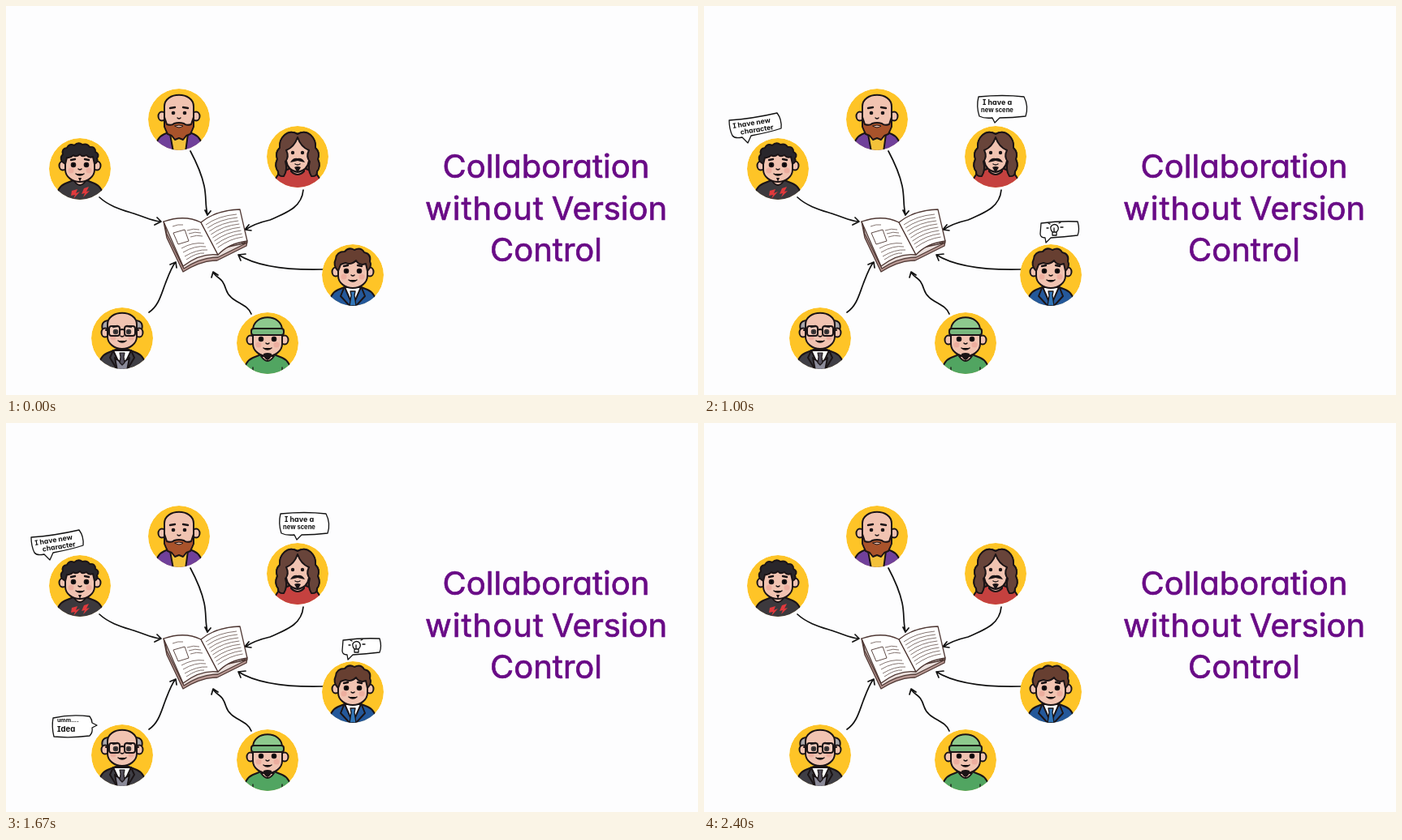
An HTML page for the animation above (2.47 s loop, 852 by 480 pixels).

```html
<!DOCTYPE html>
<html lang="en">
<head>
<meta charset="utf-8">
<title>Collaboration without Version Control</title>
<style>
  html, body { margin: 0; width: 100%; height: 100%; overflow: hidden; background: #fdfdfe; }
  svg { display: block; width: 100vw; height: 100vh; }
  text { font-family: Inter, "Open Sans", sans-serif; font-feature-settings: "cv11", "cv08"; }
  .title { font-size: 40px; fill: #690b86; stroke: #690b86; stroke-width: .7; stroke-linejoin: round; text-anchor: middle; }
  .line { fill: none; stroke: #111; stroke-width: 1.7; stroke-linecap: round; stroke-linejoin: round; }
  .face { stroke: #1b1416; stroke-width: 2; stroke-linejoin: round; stroke-linecap: round; }
  .face .open { fill: none; }
  .face .dot { fill: #1b1416; stroke: none; }
  .skin { fill: #f1c3b1; }
  .blush { fill: #e89a8e; stroke: none; opacity: .5; }
  .bubble { visibility: hidden; }
  .bubble path { fill: #fff; stroke: #111; stroke-width: 1.3; stroke-linejoin: round; stroke-linecap: round; }
  .bubble text { font-weight: 700; fill: #111; }
</style>
</head>
<body>
<svg viewBox="0 0 852 480">
  <defs>
    <clipPath id="disc"><circle r="38"/></clipPath>
    <g id="ears" class="skin">
      <ellipse cx="-21" cy="-4" rx="4.5" ry="5.5"/><ellipse cx="21" cy="-4" rx="4.5" ry="5.5"/>
    </g>
    <path id="head" class="skin" d="M-18-14C-18-33 18-33 18-14V1C18 10 9 16 0 16S-18 10-18 1Z"/>
    <g id="look">
      <circle class="blush" cx="-11" cy="2" r="3.5"/><circle class="blush" cx="11" cy="2" r="3.5"/>
      <circle class="dot" cx="-8" cy="-5" r="2.3"/><circle class="dot" cx="8" cy="-5" r="2.3"/>
      <path class="open" d="M-11-11L-6-12M6-12L11-11" stroke-width="2.4"/>
      <path class="open" d="M-2 0Q0 2 2 0M-5 6Q0 10 5 6" stroke-width="1.5"/>
    </g>
    <path id="body" d="M-31 40Q-28 22-18 18L-8 14H8L18 18Q28 22 31 40Z"/>
  </defs>

  <g id="arrows" class="line"></g>

  <g stroke="#4f3834" stroke-width="1.3" stroke-linejoin="round">
    <path fill="#b99994" d="M194 266L198 286L218 328Q240 314 260 314L296 296L297 290L260 306Z"/>
    <path fill="#eadfdc" d="M195 268L198 281L219 324Q240 310 261 310L297 292L260 300Z"/>
    <path fill="#fff" d="M194 266Q220 257 240 267L261 307Q240 304 218 321Z"/>
    <path fill="#fff" d="M240 267Q258 252 288 251L297 290Q274 293 261 307Z"/>
    <path fill="none" stroke-width=".9" d="M206 280L220 276L225 290L212 294Z"/>
    <path fill="none" stroke="#857672" stroke-width="1" d="M205 272Q212 269 218 270M223 277Q231 274 238 276M225 281Q233 278 240 280M227 285Q235 282 242 284M216 299Q230 291 244 293M218 304Q233 295 246 297M220 309Q235 300 248 301M222 313Q235 304 244 305"/>
    <path id="rules" fill="none" stroke="#857672" stroke-width="1"/>
  </g>

  <g id="people">
    <g data-at="213 140">
      <use href="#body" fill="#70409a"/>
      <path fill="#f3c13a" d="M-11 18L-7 40H8L11 18Z"/>
      <use href="#ears"/><use href="#head" y="-2"/>
      <path fill="#a9532b" d="M-18-3L-15 6Q-9 8-6 5Q0 3 6 5Q9 8 15 6L18-3L18 9Q16 14 14 18L9 20L5 25L0 23L-5 25L-9 20L-14 18Q-16 14-18 9Z"/>
      <path class="skin" stroke-width="1" d="M-5 8Q0 12 5 8Q0 6-5 8Z"/>
      <circle class="dot" cx="-7" cy="-8" r="2.3"/><circle class="dot" cx="7" cy="-8" r="2.3"/>
      <path class="open" d="M-11-14L-5-15M5-15L11-14" stroke-width="2.4"/>
      <path class="open" d="M-2-2Q0 0 2-2" stroke-width="1.4"/>
    </g>
    <g data-at="91 201">
      <use href="#body" fill="#3c393d"/>
      <path class="skin" d="M-7 15Q0 25 7 15Z"/>
      <path fill="#e0393c" stroke="none" d="M-10 27L-3 25L-5 30L0 28L-8 37L-6 32L-11 33ZM5 24L11 22L8 28L12 27L4 35L6 30L2 31Z"/>
      <use href="#ears"/><use href="#head"/><use href="#look"/>
      <path fill="#29262b" d="M-18-6L-22-9Q-25-14-21-18Q-23-25-16-26Q-13-32-7-29Q-2-34 3-30Q9-32 12-27Q19-28 19-21Q25-18 21-13Q23-9 18-6L16-15Q11-13 8-17Q3-14 0-18Q-5-14-8-17Q-12-13-16-14Z"/>
      <path class="dot" d="M-2 11H2L0 16Z"/>
    </g>
    <g data-at="359 186">
      <path fill="#68443a" d="M0-28C-13-35-23-23-22-11Q-28-5-25 3Q-29 12-24 18Q-25 26-15 28H15Q25 26 24 18Q29 12 25 3Q28-5 22-11C23-23 13-35 0-28Z"/>
      <use href="#body" fill="#c5413f"/>
      <path class="skin" d="M-8 13V18Q0 26 8 18V13Z"/>
      <path class="skin" d="M-14-10Q-12-20 0-23Q12-20 14-10V5Q12 17 0 19Q-12 17-14 5Z"/>
      <path fill="#68443a" d="M0-28C-13-35-23-23-22-11Q-28-5-25 3Q-29 12-24 18Q-24 25-17 24Q-12 16-15 6Q-10 0-14-8Q-4-12 0-24Q4-12 14-8Q10 0 15 6Q12 16 17 24Q24 25 24 18Q29 12 25 3Q28-5 22-11C23-23 13-35 0-28Z"/>
      <circle class="dot" cx="-6" cy="-5" r="2.2"/><circle class="dot" cx="6" cy="-5" r="2.2"/>
      <path class="dot" d="M0 2Q6 1 9 7Q4 6 0 5Q-4 6-9 7Q-6 1 0 2ZM-4 13Q0 11 4 13L0 20Z"/>
      <path class="open" d="M-3 9Q0 11 3 9" stroke-width="1.4"/>
    </g>
    <g data-at="427 332">
      <use href="#body" fill="#24589a"/>
      <path fill="#fff" d="M-10 15L0 38L10 15Z"/>
      <path fill="#3276b8" stroke-width="1.3" d="M-3 20H3L2 25L4 38H-4L-2 25Z"/>
      <path class="open" d="M-11 16L-15 26L-3 39M11 16L15 26L3 39"/>
      <use href="#ears"/><use href="#head"/><use href="#look"/>
      <path fill="#673f31" d="M-18-5Q-25-12-21-20Q-20-29-10-29Q-5-35 2-31Q10-35 14-28Q23-26 21-17Q24-11 18-5L16-14Q8-11 4-18Q-2-12-9-15Q-13-14-15-13Z"/>
    </g>
    <g data-at="143 410">
      <use href="#body" fill="#3f3e45"/>
      <path fill="#fff" d="M-11 15L0 39L11 15Z"/>
      <path fill="#8b8a99" d="M-9 24L0 31L9 24L6 40H-6Z"/>
      <path fill="#55505d" stroke-width="1.2" d="M-3 18H3L2 23L3 30L0 33L-3 30L-2 23Z"/>
      <path class="open" d="M-11 15L-15 24L-6 39M11 15L15 24L6 39"/>
      <g transform="translate(0 -3)">
        <path fill="#a9a6aa" d="M-17-19Q-27-18-24-7L-18-4ZM17-19Q27-18 24-7L18-4Z"/>
        <use href="#ears"/><use href="#head"/><use href="#look"/>
        <g fill="#fff" fill-opacity=".15"><rect x="-16" y="-12" width="13" height="12" rx="3"/><rect x="3" y="-12" width="13" height="12" rx="3"/></g>
        <path class="open" d="M-3-7Q0-9 3-7M-16-7H-20M16-7H20"/>
      </g>
    </g>
    <g data-at="322 416">
      <use href="#body" fill="#51a561"/>
      <path class="skin" d="M-8 16Q0 28 8 16Z"/>
      <path class="open" d="M-18 30V40M18 30V40" stroke-width="1.3"/>
      <use href="#ears"/><use href="#head"/><use href="#look"/>
      <path class="dot" d="M-5 13Q0 11 5 13Q5 19 0 21Q-5 19-5 13Z"/>
      <path fill="#8dc98d" d="M-18-16C-18-37 18-37 18-16Z"/>
      <rect x="-20" y="-18" width="40" height="8" rx="3" fill="#79b87e"/>
    </g>
  </g>

  <g class="bubble" data-from="530">
    <path d="M31 141Q60 139 90 132Q96 140 95 151Q80 156 58 160L54 169L47 162Q38 164 35 160Q31 152 31 141Z"/>
    <g transform="rotate(-9 36 151)" font-size="8.6"><text x="36" y="151">I have new</text><text x="44" y="160">character</text></g>
  </g>
  <g class="bubble" data-from="730">
    <path d="M338 112Q368 109 394 112Q400 124 396 136Q380 138 364 138L358 144L355 138Q345 139 339 136Q335 124 338 112Z"/>
    <text x="343" y="122" font-size="9">I have a</text><text x="341" y="131" font-size="7.6">new scene</text>
  </g>
  <g class="bubble" data-from="930">
    <path d="M415 268Q438 265 460 266Q463 276 460 283Q443 285 427 286L421 292L420 286Q414 286 414 281Z"/>
    <path d="M429 279Q425 274 428 271Q432 268 435 271Q438 275 434 279ZM429 279V283H434V279M431 278V274M422 274H424M439 273H442M424 268L426 269M437 268L439 267"/>
  </g>
  <g class="bubble" data-from="1200">
    <path d="M58 364Q80 359 103 362Q106 366 106 370L112 373L106 376Q107 382 103 386Q80 389 59 387Q56 375 58 364Z"/>
    <text x="63" y="369" font-size="7">umm....</text><text x="63" y="381" font-size="9.5">Idea</text>
  </g>
  <g class="bubble" data-from="1800">
    <path d="M223 379Q246 376 271 378L272 386L277 389L272 392Q273 400 270 404Q247 407 224 405Q219 392 223 379Z"/>
    <text x="227" y="388" font-size="7.6">Improve</text><text x="224" y="398" font-size="6.6">chapter no 6</text>
  </g>
  <g class="bubble" data-from="2000">
    <path d="M196 76Q218 72 240 75Q243 84 240 92Q226 94 215 94L211 99L209 94Q200 95 196 91Q194 83 196 76Z"/>
    <g transform="rotate(-2 198 84)" font-size="6.8"><text x="198" y="83">I’m working</text><text x="198" y="90">on chapter 5</text></g>
  </g>

  <g class="title">
    <text x="665" y="212">Collaboration</text>
    <text x="589.500" y="264" letter-spacing="1">without</text>
    <text x="743" y="264">Version</text>
    <text x="665" y="315">Control</text>
  </g>
</svg>
<script>
  const LOOP = 2470, HIDE_AT = 2330;
  const SVG = "http://www.w3.org/2000/svg";

  function add(parent, tag, attrs, first) {
    const node = document.createElementNS(SVG, tag);
    for (const key in attrs) node.setAttribute(key, attrs[key]);
    parent.insertBefore(node, first ? parent.firstChild : null);
    return node;
  }

  // Each arrow: shaft, then the open head
  for (const d of [
    "M227 179C235 194 241 208 244 222S245 246 248 257M245 252L248 258L252 253",
    "M115 236C128 248 145 252 160 257S180 265 190 266M186 261L191 266L183 270",
    "M366 227C364 249 345 255 325 264C312 267 302 271 295 276M299 270L294 276L302 277",
    "M390 325C350 326 310 322 286 307M295 306L286 307L289 314",
    "M176 378C188 370 191 356 196 343S203 324 208 317M202 319L209 316L210 323",
    "M302 380C297 366 276 366 271 350S262 338 255 329M253 335L255 328L261 332"
  ]) add(arrows, "path", { d });

  // Text rules on the right-hand page
  rules.setAttribute("d", Array.from({ length: 8 }, (_, i) => {
    const x = 246 + i * 2.1, y = 270 + i * 4;
    return `M${x} ${y}Q${x + 15} ${y - 11} ${284 + i * 1.1} ${y - 13}`;
  }).join(""));

  for (const person of people.querySelectorAll("[data-at]")) {
    person.setAttribute("transform", `translate(${person.dataset.at})`);
    person.setAttribute("class", "face");
    person.setAttribute("clip-path", "url(#disc)");
    add(person, "circle", { r: 38, fill: "#fec427", stroke: "none" }, true);
  }

  const bubbles = document.querySelectorAll(".bubble");
  function draw(now) {
    const t = now % LOOP;
    for (const bubble of bubbles) {
      const shown = t >= +bubble.dataset.from && t < HIDE_AT;
      bubble.style.visibility = shown ? "visible" : "hidden";
    }
    requestAnimationFrame(draw);
  }
  draw(0);
</script>
</body>
</html>
```
